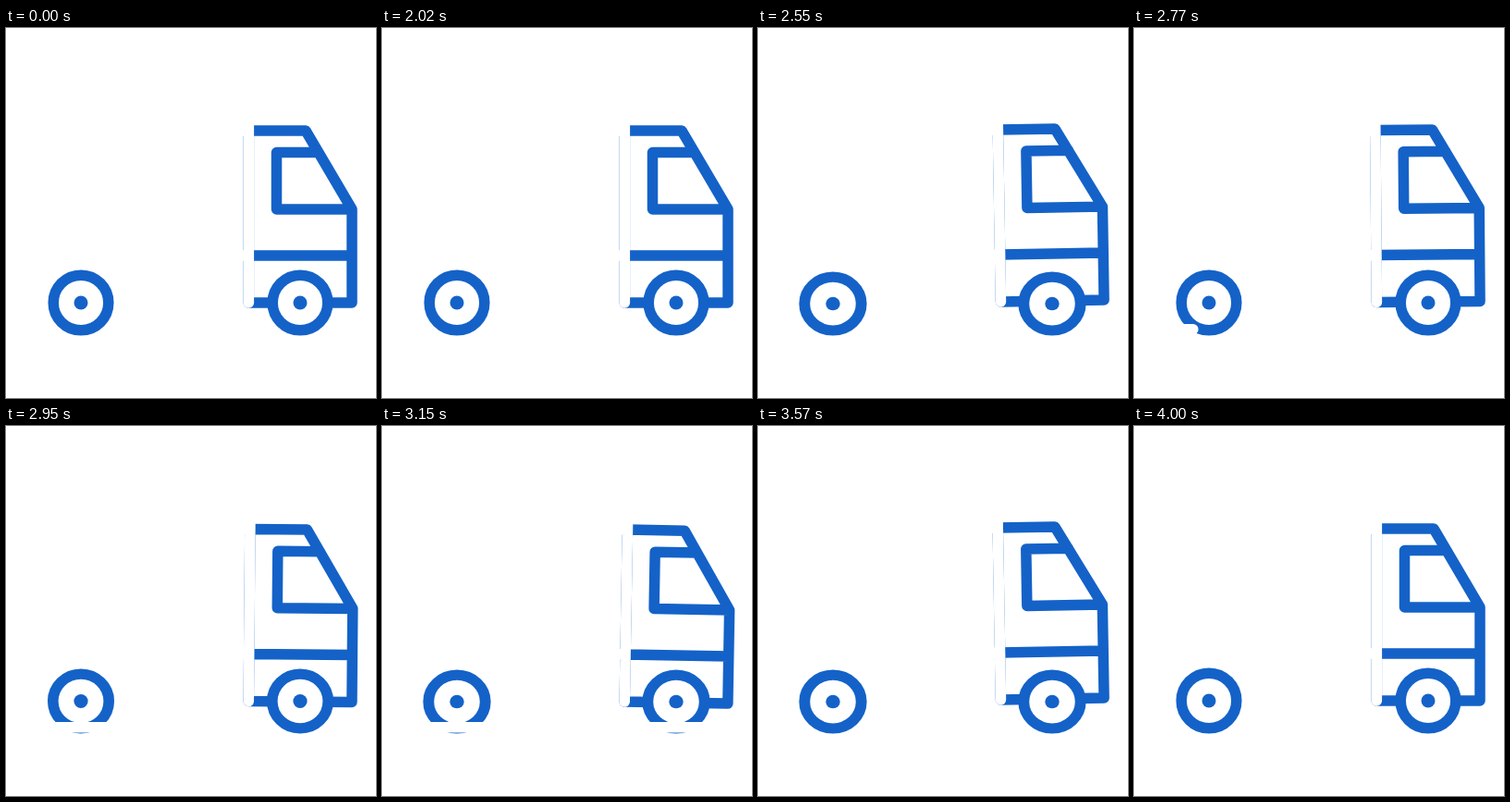
An HTML page that plays this animation: 400 px wide and 400 px high, repeating every 4020 ms.

```html
<!DOCTYPE html>
<html lang="en">
<head>
<meta charset="utf-8">
<title>Truck</title>
<style>
  html, body { margin: 0; height: 100%; overflow: hidden; background: #fff; }
  svg { display: block; width: 100vw; height: 100vh; }
  .line { fill: none; stroke-width: 11.5; stroke-linecap: round; stroke-linejoin: round; }
  .blue { stroke: #1462c8; }
  .white { stroke: #fff; }
</style>
</head>
<body>
<svg viewBox="0 0 400 400">
  <defs>
    <g id="wheel">
      <circle r="29.8" fill="#fff" stroke="#1462c8" stroke-width="11.5"/>
      <circle r="7.5" fill="#1462c8"/>
    </g>
  </defs>
  <g id="body" class="line">
    <path class="blue" d="M262.35 111H324L374 196V297H262.35Z M338 134.5H292.5V196H374 M262.35 246H374"/>
    <!-- white cargo box edge over the cab -->
    <path class="white" d="M262.35 104V297 M200 111H262 M200 246H262"/>
  </g>
  <use class="wheel" href="#wheel" data-x="81"/>
  <use class="wheel" href="#wheel" data-x="318"/>
  <path id="road" class="line white"/>
</svg>
<script>
  const LOOP = 4020, GROUND = 332.5;
  const body = document.getElementById('body');
  const road = document.getElementById('road');
  const wheels = document.querySelectorAll('.wheel');

  // [time, value] keys, eased in and out between neighbours
  const tilt = [[2020, 0], [2290, 1], [2580, -1], [3140, 1], [3590, -1], [4000, 0]];
  const squash = [[2020, 0], [2270, 1], [2410, 0], [2550, 1], [2770, 0],
                  [3150, 1], [3370, 0], [3570, 1], [4000, 0]];
  const roadHead = [[2650, 0], [3100, 380]];
  const roadTail = [[3150, 0], [3560, 380]];

  function at(keys, t) {
    if (t <= keys[0][0]) return keys[0][1];
    for (let i = 1; i < keys.length; i++) {
      const [t0, a] = keys[i - 1], [t1, b] = keys[i];
      if (t < t1) return a + (b - a) * (1 - Math.cos(Math.PI * (t - t0) / (t1 - t0))) / 2;
    }
    return keys[keys.length - 1][1];
  }

  function draw(t) {
    body.setAttribute('transform', `rotate(${at(tilt, t)} 200 290)`);
    const s = 0.03 * at(squash, t);
    for (const w of wheels) {
      w.setAttribute('transform',
        `translate(${w.dataset.x} ${GROUND}) scale(${1 + s} ${1 - s}) translate(0 -35.5)`);
    }
    road.setAttribute('d', `M${at(roadTail, t)} 325.75H${at(roadHead, t)}`);
  }

  const start = performance.now();
  function frame(now) {
    draw(Math.max(0, now - start) % LOOP);
    requestAnimationFrame(frame);
  }
  draw(0);
  requestAnimationFrame(frame);
</script>
</body>
</html>
```
